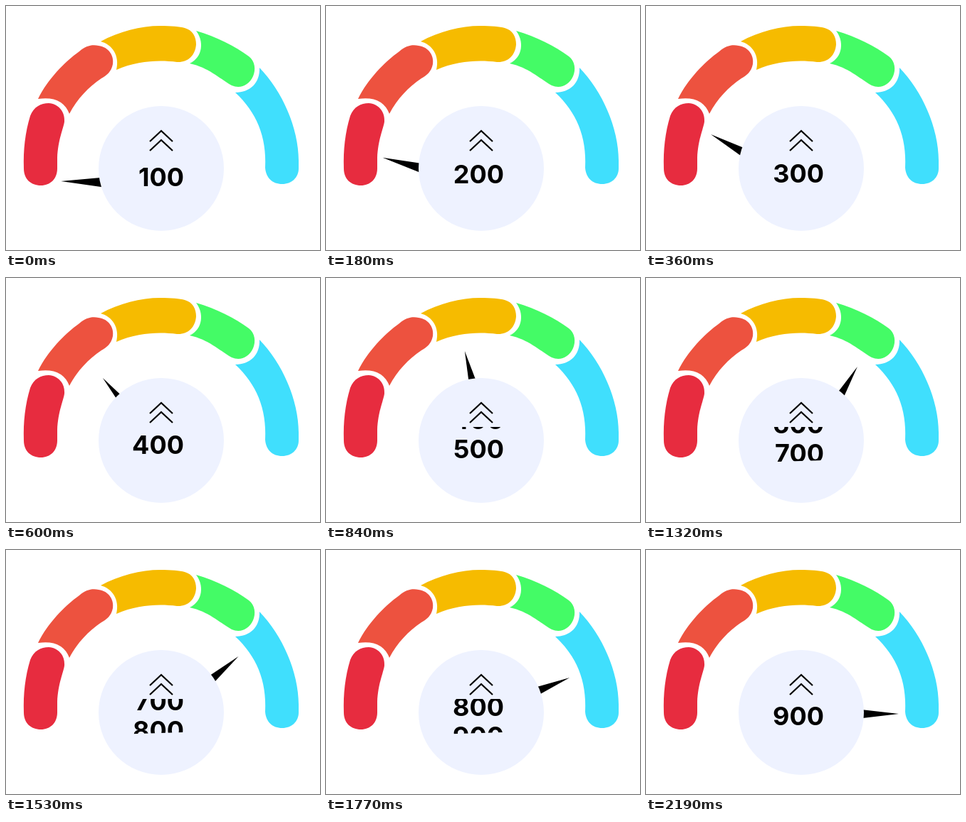
An HTML page for the animation above (4.76 s loop, 441 by 344 pixels).

```html
<!DOCTYPE html>
<html lang="en">
<head>
<meta charset="utf-8">
<title>Score gauge</title>
<style>
  html, body { margin: 0; width: 100%; height: 100%; overflow: hidden; background: #fff; }
  svg { display: block; width: 441px; height: 344px; }
  text { font: 700 36px Inter, "Open Sans", sans-serif; text-anchor: end; }
</style>
</head>
<body>
<svg viewBox="0 0 441 344">
  <clipPath id="slot"><path d="M165 210H265V256.5L165 259.5Z"/></clipPath>

  <path fill="#e72c3f" d="M25 229C24 203 27 178 34 155C39 142 49 137 60 137C74 138 83 149 82 163C81 172 73 188 72 214V229C72 244 62 253 49 253C35 253 25 244 25 229Z"/>
  <path fill="#ed523f" d="M45 131C58 104 82 79 103 64C112 56 121 54 130 56C145 58 152 71 150 82C148 93 141 98 134 102C116 114 100 131 89 152Q79 126 45 131Z"/>
  <path fill="#f6bb00" d="M133 50C158 36 190 28 216 28C233 28 244 29 251 31C262 34 267 43 267 54C266 70 255 80 240 79C215 76 185 77 155 90C160 70 149 54 133 50Z"/>
  <path fill="#44fb66" d="M267 35C295 43 322 57 341 71C350 78 351 90 347 99C341 112 329 117 317 112C298 101 285 87 258 81C277 72 278 49 267 35Z"/>
  <path fill="#40dffd" d="M356 87C388 120 411 172 411 218V229C411 242 401 251 388 251C374 251 365 242 364 228C366 184 352 150 322 122C343 122 357 108 356 87Z"/>

  <path id="needle" d="M0 0L72 -8.4V8.4Z"/>
  <circle cx="218" cy="229" r="88" fill="#eef2ff"/>
  <path d="M202 191L218 176L234 191M202 204L218 189L234 204" fill="none" stroke="#000" stroke-width="2.2"/>
  <g clip-path="url(#slot)"><g id="reel"></g></g>
</svg>
<script>
const LOOP = 4760, STEP = 30, END = 2190;
const PIVOT = { x: 217, y: 240 };
const ROW = 41, BASE = 249;

// time, tip angle, tip radius, needle heading (degrees clockwise from the left)
const SWING = [
  [0, -2.9, 140, 1.5],
  [360, 25.1, 139, 29],
  [540, 42.9, 133.7, 44],
  [600, 50.7, 128, 50],
  [900, 88, 141, 82],
  [1080, 107, 140, 98],
  [1320, 124.8, 140, 120.7],
  [1620, 146.8, 142, 147],
  [1770, 154.4, 138.7, 157.5],
  [2190, 176.3, 138.3, 180]
];
// time, position of the reel in hundreds
const SCROLL = [
  [0, 0.88], [360, 3], [600, 4.02], [1080, 5.73],
  [1320, 6.73], [1770, 8.37], [2160, 9.05], [2190, 9.05]
];

const needle = document.getElementById("needle");
const reel = document.getElementById("reel");

for (let n = 1; n <= 9; n++) {
  const label = document.createElementNS("http://www.w3.org/2000/svg", "text");
  label.setAttribute("x", 250);
  label.setAttribute("y", BASE + n * ROW);
  label.textContent = n * 100;
  reel.append(label);
}

function slope(rows, i, col) {
  const a = rows[Math.max(i - 1, 0)];
  const b = rows[Math.min(i + 1, rows.length - 1)];
  return (b[col] - a[col]) / (b[0] - a[0]);
}

// Smooth curve through the rows of a table
function sample(rows, col, t) {
  let i = 0;
  while (i < rows.length - 2 && t >= rows[i + 1][0]) i++;
  const a = rows[i], b = rows[i + 1], span = b[0] - a[0];
  const u = (t - a[0]) / span, v = 1 - u;
  return a[col] * (1 + 2 * u) * v * v
    + b[col] * (1 + 2 * v) * u * u
    + span * u * v * (slope(rows, i, col) * v - slope(rows, i + 1, col) * u);
}

function draw(time) {
  const t = Math.min(Math.floor((time % LOOP) / STEP) * STEP, END);
  const angle = sample(SWING, 1, t) * Math.PI / 180;
  const radius = sample(SWING, 2, t);
  const x = PIVOT.x - radius * Math.cos(angle);
  const y = PIVOT.y - radius * Math.sin(angle);
  needle.setAttribute("transform", `translate(${x} ${y}) rotate(${sample(SWING, 3, t)})`);
  reel.setAttribute("transform", `translate(0 ${-ROW * sample(SCROLL, 1, t)})`);
}

const start = performance.now();
function tick() {
  draw(performance.now() - start);
  requestAnimationFrame(tick);
}
tick();
</script>
</body>
</html>
```
